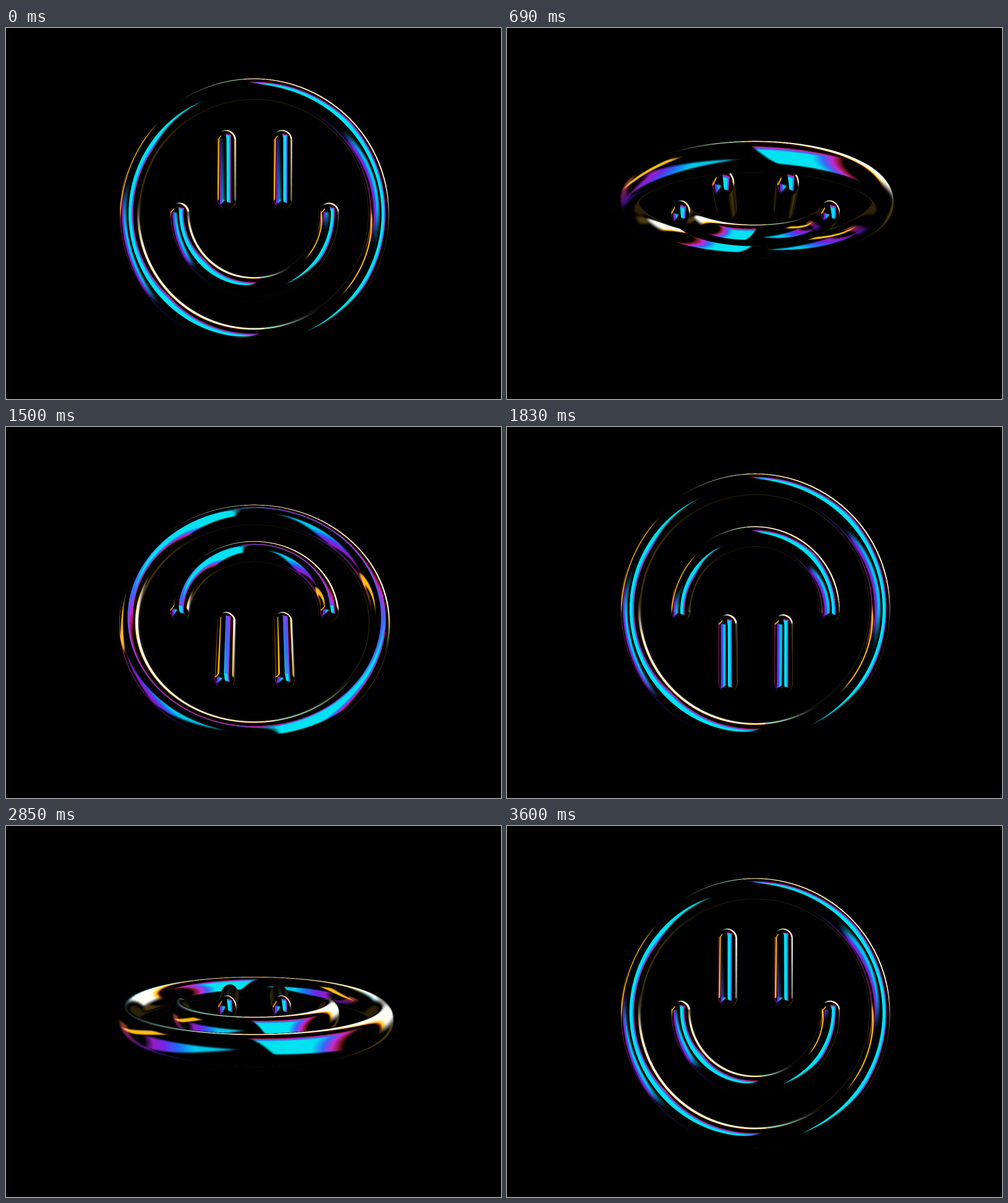
An HTML page with a canvas for the animation above (3.63 s loop, 800 by 600 pixels).

```html
<!DOCTYPE html>
<html lang="en">
<head>
<meta charset="utf-8">
<title>Chrome smiley</title>
<style>
  html, body { margin: 0; width: 100%; height: 100%; overflow: hidden; background: #000; }
  canvas { position: absolute; left: 166px; top: 63px; width: 470px; height: 470px; }
</style>
</head>
<body>
<canvas id="view" width="940" height="940"></canvas>
<script>
const SIZE = 940, HALF = SIZE / 2, SCALE = 2;
const CAMERA = 800;               // distance from the pivot
const TUBE = 16.5, DEPTH = 20.5;  // half width and half depth of the tubes
const STEP = 30, STEPS = 121;     // 3630 ms for a full turn
const TILT = .02;                 // angle at the start of the loop
const SIDES = 28, CAP = 7;

const ctx = document.getElementById('view').getContext('2d');
const image = ctx.createImageData(SIZE, SIZE);
const pixels = new Uint32Array(image.data.buffer);
const nearness = new Float32Array(SIZE * SIZE);

const { PI, abs, min, max, hypot, sin, cos, floor, ceil } = Math;
const clamp = v => min(1, max(0, v));
const smooth = (a, b, v) => { const t = clamp((v - a) / (b - a)); return t * t * (3 - 2 * t); };
const band = (a, b, c, d, v) => smooth(a, b, v) * (1 - smooth(c, d, v));

// ---- Environment, stored by the half vector between reflection and viewer ----
function ramp(stops, v) {
  let i = 0;
  while (i < stops.length - 2 && v > stops[i + 1][0]) i++;
  const [a, from] = stops[i], [b, to] = stops[i + 1];
  const t = clamp((v - a) / (b - a));
  return from.map((c, k) => c + (to[k] - c) * t);
}

const BLACK = [0, 0, 0], CYAN = [0, 226, 240], BLUE = [60, 100, 250], MAGENTA = [205, 40, 205];
const EDGE = [[-.05, BLACK], [-.015, [120, 25, 30]], [.035, MAGENTA], [.095, BLUE], [.17, CYAN]];
const SIDE = [[-.73, BLACK], [-.66, [150, 30, 200]], [-.58, [110, 40, 235]], [-.49, [30, 110, 250]], [-.39, [0, 200, 238]]];
const GLOW = [[0, BLACK], [.2, [150, 30, 20]], [.5, [255, 205, 30]], [1, [255, 255, 245]]];
const RIM = [[165, [255, 130, 40]], [185, [230, 50, 150]], [210, [130, 30, 220]], [255, [20, 40, 150]]];

function environment(x, y) {
  const rgb = [0, 0, 0];
  const add = (colour, amount) => colour.forEach((c, k) => rgb[k] += c * amount);
  const rho = hypot(x, y);
  let angle = Math.atan2(y, x) * 180 / PI;
  if (angle < -100) angle += 360;

  // large panel on the right with a slanted left edge
  const left = x - .062 + .165 * y, bottom = y + .35 + .25 * (x - .12);
  add(ramp(EDGE, min(.6 - .2 * x - y, .54 - x)), smooth(0, .035, left) * smooth(0, .13, bottom));

  // wedge on the left
  const above = .03 - .22 * (x + .06) - y, below = y + .08 - (x + .06);
  add(ramp(SIDE, x), smooth(0, .16, above) * smooth(0, .18, below) * smooth(.58, .4, -y) * smooth(-.05, -.18, x));

  // yellow streak beside the wedge
  const across = .8 * (x + .56) - .6 * (y - .38), along = -.6 * (x + .56) - .8 * (y - .38);
  add([255, 190, 20], band(-.12, .02, .42, .55, along) * (1 - smooth(.02, .07, abs(across))));

  // white strip near the upper right rim
  const inner = .82 + .05 * smooth(55, 95, angle);
  const glow = ramp(GLOW, (rho - inner) / .06);
  if (angle > 95) { glow[0] *= .6; glow[1] *= .9; }
  add(glow, band(-12, 18, 95, 128, angle) * (1 - smooth(.955, .98, rho)));

  // thin coloured rims
  add([255, 195, 30], .3 * band(.92, .95, .97, .99, rho) * band(-70, -30, -12, 5, angle));
  add(ramp(RIM, angle), .55 * band(.82, .86, .88, .93, rho) * band(158, 170, 220, 255, angle));
  add([150, 110, 30], .3 * smooth(.98, .995, rho));

  const [r, g, b] = rgb.map(c => min(255, c));
  return (255 << 24 | b << 16 | g << 8 | r) >>> 0;
}

const MAP = 512, MID = (MAP - 1) / 2;
const lightMap = new Uint32Array(MAP * MAP);
for (let j = 0; j < MAP; j++)
  for (let i = 0; i < MAP; i++)
    lightMap[j * MAP + i] = environment(i / MID - 1, j / MID - 1);

// ---- Model: tubes swept along flat paths, with rounded ends ----
const vertices = [], triangles = [];

function addTube(path, steps, capped) {
  const stations = [];
  for (let i = 0; i <= steps; i++) stations.push([i / steps, 0]);
  if (capped)
    for (let i = 1; i <= CAP; i++) {
      stations.unshift([0, -i / CAP * PI / 2]);
      stations.push([1, i / CAP * PI / 2]);
    }
  const base = vertices.length;
  stations.forEach(([t, q], row) => {
    const [x, y, tx, ty] = path(t);
    for (let k = 0; k < SIDES; k++) {
      const v = k / SIDES * 2 * PI;
      const a = cos(q) * cos(v), b = cos(q) * sin(v), c = sin(q);
      const length = hypot(a / TUBE, b / DEPTH, c / TUBE);
      const dx = a * ty + c * tx, dy = c * ty - a * tx;
      vertices.push({
        px: x + TUBE * dx, py: y + TUBE * dy, pz: DEPTH * b,
        mx: dx / TUBE / length, my: dy / TUBE / length, mz: b / DEPTH / length
      });
      if (!row) continue;
      const next = (k + 1) % SIDES, here = base + row * SIDES, prev = here - SIDES;
      triangles.push([prev + k, prev + next, here + k], [prev + next, here + next, here + k]);
    }
  });
}

const arc = (cy, radius, start, span) => t => {
  const a = start + span * t;
  return [radius * cos(a), cy + radius * sin(a), -sin(a), cos(a)];
};
const eye = x => t => [x, 116.5 - 96 * t, 0, -1];

addTube(arc(-2.5, 201, 0, 2 * PI), 144, false);
addTube(arc(0, 120.5, PI, PI), 56, true);
addTube(eye(-45), 6, true);
addTube(eye(45), 6, true);
const faces = triangles.map(t => t.map(i => vertices[i]));

// ---- Rendering ----
function project(v, c, s) {
  const y = v.py * c - v.pz * s, z = v.py * s + v.pz * c;
  v.nx = v.mx;
  v.ny = v.my * c - v.mz * s;
  v.nz = v.my * s + v.mz * c;
  v.facing = v.nz * (CAMERA - z) - v.nx * v.px - v.ny * y;
  v.near = CAMERA / (CAMERA - z);
  v.x = HALF + v.px * v.near * SCALE;
  v.y = HALF - y * v.near * SCALE;
}

function shade(x, y, nx, ny, nz) {
  let vx = (x - HALF) / SCALE, vy = (HALF - y) / SCALE;
  const far = Math.sqrt(vx * vx + vy * vy + CAMERA * CAMERA);
  vx /= far;
  vy /= far;
  const vz = -CAMERA / far;
  const dot = 2 * min(0, nx * vx + ny * vy + nz * vz) / (nx * nx + ny * ny + nz * nz);
  const hx = vx - dot * nx, hy = vy - dot * ny, hz = vz - dot * nz + 1;
  const length = Math.sqrt(hx * hx + hy * hy + hz * hz) + 1e-6;
  return lightMap[((hy / length + 1) * MID + .5 | 0) * MAP + ((hx / length + 1) * MID + .5 | 0)];
}

function fillTriangle([a, b, c]) {
  if (a.facing < 0 && b.facing < 0 && c.facing < 0) return;
  const bx = b.x - a.x, by = b.y - a.y, cx = c.x - a.x, cy = c.y - a.y;
  const area = bx * cy - cx * by;
  if (!area) return;
  const x0 = max(0, ceil(min(a.x, b.x, c.x))), x1 = min(SIZE - 1, floor(max(a.x, b.x, c.x)));
  const y0 = max(0, ceil(min(a.y, b.y, c.y))), y1 = min(SIZE - 1, floor(max(a.y, b.y, c.y)));
  for (let y = y0; y <= y1; y++)
    for (let x = x0; x <= x1; x++) {
      const dx = x - a.x, dy = y - a.y;
      const u = (dx * cy - cx * dy) / area, v = (bx * dy - dx * by) / area, w = 1 - u - v;
      if (u < 0 || v < 0 || w < 0) continue;
      const near = w * a.near + u * b.near + v * c.near, i = y * SIZE + x;
      if (near <= nearness[i]) continue;
      nearness[i] = near;
      pixels[i] = shade(x, y,
        w * a.nx + u * b.nx + v * c.nx,
        w * a.ny + u * b.ny + v * c.ny,
        w * a.nz + u * b.nz + v * c.nz);
    }
}

function render(angle) {
  const c = cos(angle), s = sin(angle);
  pixels.fill(0xff000000);
  nearness.fill(0);
  for (const v of vertices) project(v, c, s);
  for (const face of faces) fillTriangle(face);
  ctx.putImageData(image, 0, 0);
}

let shown = -1;
function tick() {
  const step = floor(performance.now() / STEP) % STEPS;
  if (step !== shown) render((shown = step) / STEPS * 2 * PI + TILT);
  requestAnimationFrame(tick);
}
tick();
</script>
</body>
</html>
```
